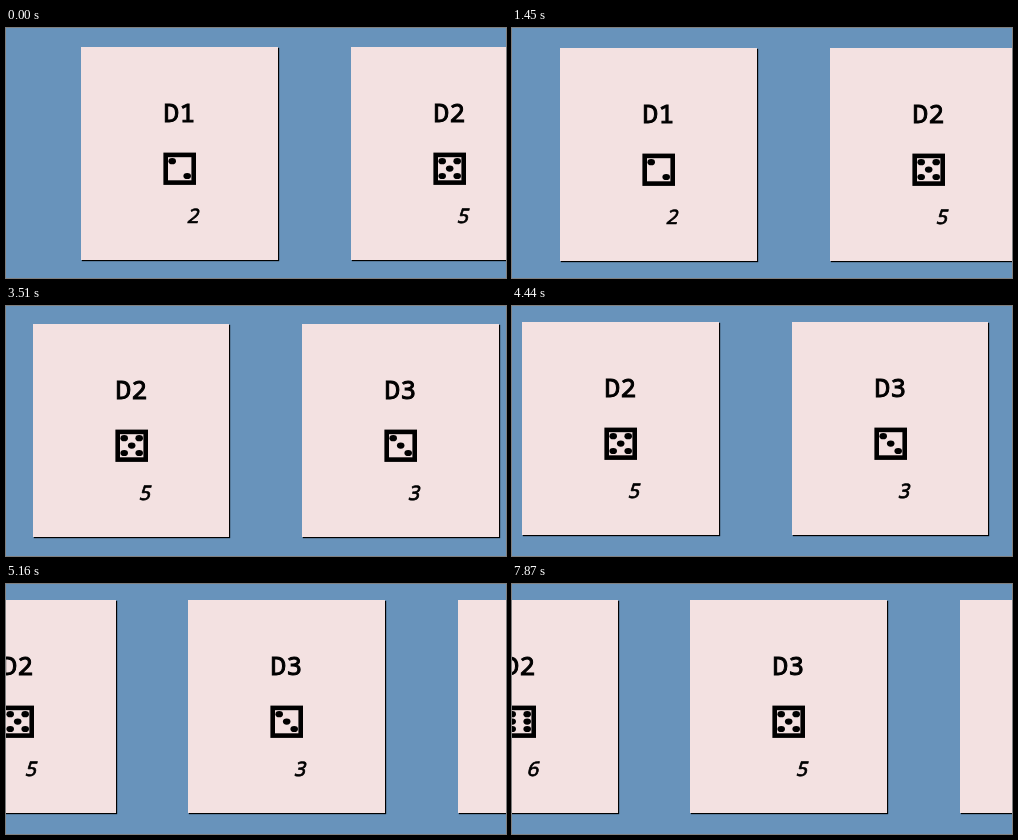
These frames come from a looping animation (500x250 px, 8000 ms). An HTML page:

```html
<!DOCTYPE html>
<html lang="en">
<head>
<meta charset="utf-8">
<title>Dice cards</title>
<style>
  html, body { margin: 0; width: 100%; height: 100%; overflow: hidden; }
  #stage { position: relative; width: 100%; height: 100%; overflow: hidden; contain: strict; background: #6893bb; }
  .card {
    position: absolute; width: 196.8px; height: 213px;
    background: #f3e1e1; box-shadow: 1px 1px 1px #000;
  }
  svg { display: block; overflow: hidden; }
  text { font-family: "Noto Sans Mono", monospace; text-anchor: middle; stroke: #000; }
  .title { font-size: 26px; letter-spacing: .6px; stroke-width: 1px; }
  .value { font-size: 20px; font-style: italic; stroke-width: .7px; }
</style>
</head>
<body>
<div id="stage"></div>
<script>
const LOOP = 8000, SPACING = 269.5;
const FIRST_FACES = [2, 5, 3, 4];
const ROLL_TIMES = [6690, 7240, 7720, 7870];

// Scrolling jumps between these stops: [time, x of the first card, y]
const STOPS = [
  [0, 75.2, 19], [1450, 48.2, 20], [1680, -159.9, 18], [3510, -242.9, 18], [4160, -259.5, 16],
  [4480, -267.2, 16], [4840, -290.9, 14], [5160, -356.6, 16], [5670, -360.8, 16]
];

function pips(n) {
  const spots = [];
  const pair = (x, y) => spots.push([x, y], [-x, -y]);
  if (n % 2) spots.push([0, 0]);
  if (n > 1) pair(-1, -1);
  if (n > 3) pair(1, -1);
  if (n === 6) pair(1, 0);
  return spots.map(([x, y]) =>
    `<ellipse cx="${98.7 + x * 7.5}" cy="${121.6 + y * 7.4}" rx="3.8" ry="3.1"/>`).join("");
}

const cards = FIRST_FACES.map((first, i) => {
  const el = document.createElement("div");
  el.className = "card";
  el.innerHTML = `<svg width="196" height="213">
    <text class="title" x="98.6" y="75">D${i + 1}</text>
    <rect x="84.7" y="107.9" width="28" height="27.7" fill="none" stroke="#000" stroke-width="4.6"/>
    <g></g>
    <text class="value" x="111.3" y="175.5"></text></svg>`;
  stage.append(el);
  return { el, first, dots: el.querySelector("g"), label: el.querySelector(".value") };
});

function draw(t) {
  const [, x, y] = STOPS.findLast(stop => stop[0] <= t);
  const rolls = ROLL_TIMES.filter(time => time <= t).length;
  cards.forEach(({ el, first, dots, label }, i) => {
    el.style.left = `${x + i * SPACING}px`;
    el.style.top = `${y}px`;
    // Powers of 3 modulo 7 run through all six faces
    const face = first * 3 ** rolls % 7;
    dots.innerHTML = pips(face);
    label.textContent = face;
  });
}

const start = performance.now();
function tick() {
  draw((performance.now() - start) % LOOP);
  requestAnimationFrame(tick);
}
tick();
</script>
</body>
</html>
```
